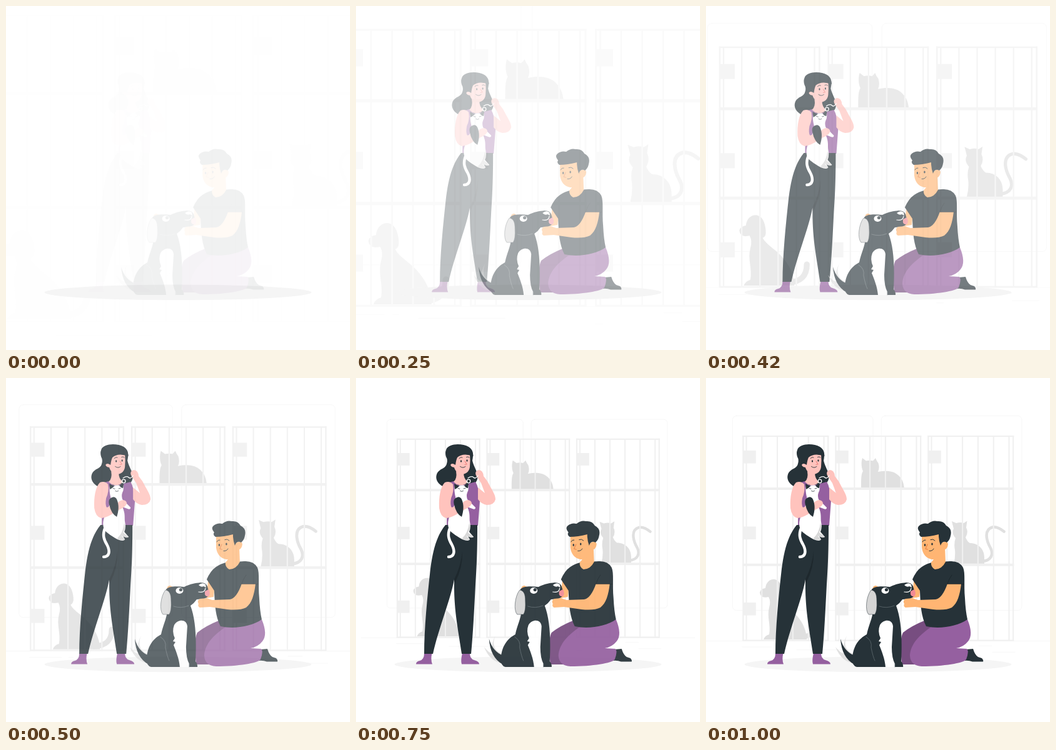
Write an HTML page that moves like this. It is 550 px wide and 550 px high and loops after 1040 ms.

```html
<!DOCTYPE html>
<html lang="en">
<head>
<meta charset="utf-8">
<title>Pet adoption</title>
<style>
  html, body { margin: 0; height: 100%; overflow: hidden; background: #fff; }
  svg { display: block; width: 100vw; height: 100vh; }
  .dark { fill: #263238; }
  .purple { fill: #9560a0; }
  .rose { fill: #ffc3bd; }
  .tan { fill: #ffb573; }
  .white { fill: #fff; }
  .grey { fill: #e0e0e0; }
  .line { fill: none; stroke-linecap: round; stroke-linejoin: round; }
</style>
</head>
<body>
<svg viewBox="0 0 550 550">
  <g id="room">
    <g class="line" stroke="#ebebeb" stroke-width=".4">
      <rect x="42.5" y="60.5" width="224.5" height="311" rx="6"/>
      <rect x="280.3" y="60.5" width="224.5" height="311" rx="6"/>
      <path d="M0 420.6H550M458 438.4h36M355 441.4h9M436 428.2h21M58 430h47M115 430h7M145 434.7h103"/>
    </g>
    <g class="grey">
      <path d="M248 176C248 162 248 153 251 149C248 143 248 134 250 128L256 132.5Q262 131 267 132.5L271 128Q273 133 275.5 136Q278 144 275 150C290 147 301 149 308 156C315 163 316 169 317 176Z"/>
      <path d="M396 297Q399 286 398 275Q396 264 399 256Q392 248 396 241L393 229L400 232Q407 230 412 232L417.5 228.5L416 239Q420 247 415 255Q418 262 422 264C436 264 445 274 445 287V297Z"/>
      <path d="M86 343Q87 337 95 336C96 326 103 321 110 322Q120 324 122 342Q123 351 118 353C122 362 138 370 147 382C156 393 161 406 161 418H92Q94 412 101 410C104 395 97 382 101 367Q104 357 100 350Q87 353 86 343Z"/>
    </g>
    <g class="line" stroke="#e0e0e0">
      <path stroke-width="4.500" d="M442 293C456 292 460 282 455 272C447 258 445 242 458 238.5Q466 237 476.500 245.500"/>
      <path stroke-width="8" d="M152 414C168 413 178 407 178 389"/>
    </g>
    <g id="cages"></g>
  </g>

  <ellipse cx="275" cy="457.900" rx="213.300" ry="12.400" fill="#f5f5f5"/>

  <g id="woman">
    <path class="dark" d="M146 115C149 104 172 104 182 110C190 115 190 122 188 132C191 146 203 156 192 169Q184 178 172 170L152 176C140 176 127 166 131 154C135 144 145 146 147 137Q149 131 146 126Q144 120 146 115Z"/>
    <path class="purple" d="M148 168L158 165L166 172L178 170L193 166Q199 176 198 190L200 196L197 236H147Z"/>
    <path class="rose" d="M162 149L174 151Q174 162 181 166Q174 174 163 170L158 166Q164 161 162 149Z"/>
    <path class="rose" d="M160 128Q170 119 184 121.500Q185 132 184 142C183 152 173 157 165 151Q160 148 159 143Q152 142 153 136Q155 132 160 136Z"/>
    <path class="dark" d="M150 111Q160 105 176 109Q189 113 189.500 125Q173 119 164 127Q162 131 161 139Q155 135 153 139L150 134Z"/>
    <path class="line" stroke="#263238" stroke-width=".9" d="M167 128.500Q170 125.500 172 127M178.500 126.500Q181 125 183 127M168.500 141.500Q173 145 177 141.500"/>
    <ellipse class="dark" cx="170" cy="133" rx="1.100" ry="1.800"/>
    <ellipse class="dark" cx="179.500" cy="132" rx="1.100" ry="1.800"/>
    <path class="line" stroke="#ed847e" stroke-width="1.200" d="M176 133L179 138L176 138.500"/>
    <path class="purple" d="M98 457.500Q98 453 104 452Q111 450 111 440H123.500Q121 450 124 457.500Z"/>
    <path class="purple" d="M171 457.500Q169 452 172 440H184Q184 449 191 451Q199 453 199 457.500Z"/>
    <path class="dark" d="M145 235H196C196 275 195 300 193 330C191 370 189 410 186 441H171C165 400 158 370 159 322C153 355 134 400 125 441H111C111 400 116 350 121 305C125 275 131 252 145 235Z"/>
    <path fill="#1e282d" d="M172 277Q173 303 160 328L159 322Q170 300 172 277Z"/>
    <path class="rose" d="M197 175L208 184L202 168L194 156Q191 149 198 147Q205 147 206 157L212 165C221 182 225 187 225 194Q223 203 211 203Q203 202 197 194Z"/>
    <path class="line" stroke="#fff" stroke-width="4.500" d="M154 236C147 249 150 258 155 266C161 277 159 286 150 286"/>
    <path class="white" d="M160 171L166 173Q172 170 176 172L181 169Q183 178 180 183Q178 188 180 194L193 207Q193 211 188 209L180 206C185 217 183 223 184 230Q186 239 183 246L190 254Q188 256 181 253L184 258Q182 262 172 258Q161 252 154 246Q147 239 150 226C153 215 160 205 162 194Q158 180 160 171Z"/>
    <path fill="#d8d8d8" d="M183 232Q186 241 181 247L190 254Q187 257 178 252L184 258Q181 261 171 257Q181 248 183 232Z"/>
    <path class="dark" d="M159 169L167 173Q164 176 160 178ZM182 168L175 172Q178 176 181 176Z"/>
    <path class="line" stroke="#263238" stroke-width=".8" d="M165 176.500l3 .8M174 177l3 -.8M168.500 180.500Q171 182.500 173.500 180.500"/>
    <path class="rose" d="M144 167Q152 164 157 170Q159 181 154 192Q152 203 155 207L172 201Q174 196 181 195Q187 196 187 201Q184 207 176 210C167 215 155 224 146 224Q137 222 135 208C134 190 137 174 144 167Z"/>
    <path class="dark" d="M160 193Q167 187 171 194C175 203 174 213 171 222Q162 217 159 203Q157 196 160 193Z"/>
    <g class="line" stroke="#fff" stroke-width="1.300">
      <circle cx="182" cy="165" r="2.800"/>
      <path d="M181 160Q187 156 190 159T197 156"/>
    </g>
  </g>

  <g id="man">
    <path class="tan" d="M333 318L344 324L341 350L329 352ZM266 338Q267 331 272 332L279 336L270 342Z"/>
    <path fill="#774d80" d="M313 458C312 442 309 418 315 407Q329 396 349 388L372 400L345 458Z"/>
    <path class="dark" d="M416 434L427 433Q430 443 435 446L441 448Q444 451 443 453.500H426Q420 451 412 452Z"/>
    <path class="purple" d="M360 398L418 386Q428 410 419 421Q412 430 400 432L417 433Q421 437 416 450C412 456 380 461 345 461Q327 460 326 444C327 424 343 410 360 398Z"/>
    <path class="dark" d="M361 295L390 293Q405 292 411 303C415 312 412 330 414 352Q415 373 418 386C402 397 374 402 352 397C344 381 343 364 342 340L330 322Q336 308 345 302Q352 297 361 295Z"/>
    <path class="tan" d="M362 282L382 269L383 294Q377 306 366 306Q359 302 360 295L364 290Z"/>
    <path class="tan" d="M345 250Q345 240 373 245L376 264Q386 258 387 266Q386 275 378 275Q375 291 361 290Q347 287 345 271Z"/>
    <path class="dark" d="M344 254Q339 250 342 247Q336 240 341 236Q347 231 355 233Q362 227 370 229Q380 228 384 236Q394 241 391 252Q390 259 385 263Q378 259 375 268Q372 260 372 250Q357 254 344 254Z"/>
    <path class="line" stroke="#263238" stroke-width="1" d="M346 262Q348 258 351 259M359 258.500Q363 256.500 366 260M357 276.500Q362 277 364 273"/>
    <ellipse class="dark" cx="350" cy="267" rx="1.200" ry="1.900"/>
    <ellipse class="dark" cx="361.500" cy="265.500" rx="1.200" ry="1.900"/>
    <path class="line" stroke="#e8874a" stroke-width="1.300" d="M354 266L351 273L354.500 274"/>

    <path class="grey" d="M226 410C219 425 222 437 240 443L238 456Q217 455 207 430Q217 442 221 440Q217 426 226 410Z"/>
    <path class="dark" d="M215 417Q221 438 238 444L237 458Q217 447 215 417Z"/>
    <path class="dark" d="M265 338C270 332 283 333 294 334C304 329 312 328 320 327Q329 327 331 333L334 343Q334 350 326 353L314 354Q310 360 304 364C312 385 314 415 312 453Q316 457 315 462H241Q233 460 234 447C236 426 246 416 257 410C260 395 266 385 267 372Z"/>
    <path class="white" d="M278 395C284 385 298 385 299 397L297 430Q297 448 302 457V462H287C286 449 281 437 277 427L280 422L276 421L279 416Q274 405 278 395Z"/>
    <path fill="#d5d5d5" stroke="#263238" stroke-width=".5" d="M264 339C271 340 273 346 273 356Q274 372 270 378H260C254 372 256 349 264 339Z"/>
    <ellipse class="white" cx="286.500" cy="340" rx="6" ry="5"/>
    <circle class="dark" cx="288.500" cy="338.500" r="2.600"/>
    <path class="white" d="M317 331Q323 326 328 330L329 335L325 333Q321 335 317 331Z"/>
    <path fill="#f28a94" d="M327 341L333 338Q337 345 333 349Q329 350 327 346Z"/>
    <g class="line" stroke="#fff" stroke-width="1.200">
      <path d="M317 342Q327 344 328 336"/>
      <path stroke="#667176" stroke-width=".7" d="M277 365Q289 369 301 364M256 414Q266 420 264 431Q267 446 270 452M302 457V462"/>
    </g>
    <path class="tan" d="M386 329H408C406 347 402 360 393 367Q383 372 363 370L335 366L319 367Q315 365 317 361Q314 356 319 353L330 352L339 355L367 354Q378 352 386 329Z"/>
    <path class="line" stroke="#182126" stroke-width=".7" d="M386 329Q389 320 393 315M386 329.500H412"/>
  </g>
</svg>
<script>
const LOOP = 1040, FRAMES = 25, FPS = 24, LEAD = 0.038;
const ROUNDING = 4; // frame starts fall on whole 10 ms, up to 4 ms early
const $ = id => document.getElementById(id);

function buildCages() {
  const rect = (x, y, w, h) => `<rect x="${x}" y="${y}" width="${w}" height="${h}"/>`;
  let out = "";
  for (const x of [58.3, 206.3, 354.3]) {
    for (const y of [116, 237.5, 359]) out += rect(x + 1.5, y, 20, 20.5);
    for (const y of [92, 418.5]) out += rect(x, y, 138, 2.2);
    for (const y of [175, 296.7]) out += rect(x, y, 138, 4);
    for (const bar of [0, 135.8]) out += rect(x + bar, 92, 2.2, 328);
    for (let i = 0; i < 6; i++) out += rect(x + 5.2 + i * 24.8, 93, 2, 326);
  }
  $("cages").innerHTML = `<g fill="#f0f0f0">${out}</g>`;
}

// Cubic Bezier easing, solved by bisection.
function bezier(x1, y1, x2, y2) {
  const at = (u, a, b) => 3 * (1 - u) ** 2 * u * a + 3 * (1 - u) * u * u * b + u ** 3;
  return x => {
    if (x >= 1) return 1;
    let lo = 0, hi = 1;
    for (let i = 0; i < 30; i++) {
      const mid = (lo + hi) / 2;
      if (at(mid, x1, x2) < x) lo = mid; else hi = mid;
    }
    return at(lo, y1, y2);
  };
}

const overshoot = bezier(0.36, -0.01, 0.5, 1.38);
const easeOut = bezier(0, 0, 0.58, 1);

function pose(id, transform, opacity) {
  $(id).setAttribute("transform", transform);
  $(id).setAttribute("opacity", Math.max(0, Math.min(1, opacity)));
}

function draw(now) {
  const step = Math.floor((now % LOOP + ROUNDING) / LOOP * FRAMES);
  const t = Math.min(step, FRAMES - 1) / FPS + LEAD;
  const p = overshoot(t), q = easeOut(t);
  pose("room", `translate(275 250) scale(${1.5 - p / 2}) translate(-275 -250)`, p);
  pose("woman", `translate(${33 * (1 - p)} 0)`, p);
  pose("man", `translate(${-33 * (1 - q)} 0)`, q);
}

buildCages();
const start = performance.now();
function tick() {
  draw(performance.now() - start);
  requestAnimationFrame(tick);
}
tick();
</script>
</body>
</html>
```
